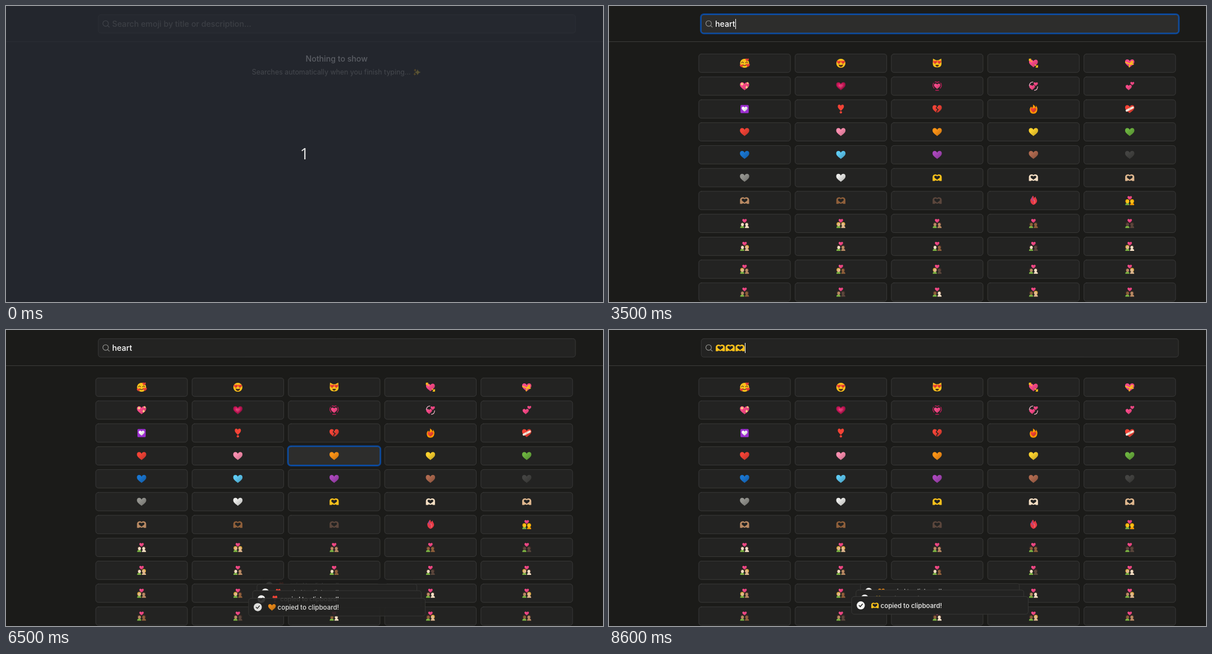
An HTML page with a canvas that plays this animation: 1063x527 px, repeating every 8800 ms.

```html
<!DOCTYPE html>
<html lang="en">
<head>
<meta charset="utf-8">
<title>Emoji search</title>
<style>
  html, body { margin: 0; width: 100%; height: 100%; overflow: hidden; background: #1b1b19; }
  canvas { display: block; }
</style>
</head>
<body>
<canvas id="stage" width="1063" height="527"></canvas>
<script>
const ctx = document.getElementById('stage').getContext('2d');
const LOOP = 8800;
const K = 1063 / 1200; // layout pixels to stage pixels
const BG = '#1b1b19', PANEL = '#232322', ACTIVE = '#2d2d2c', LINE = '#3c3c3a';
const RED = '#f44336', PINK = '#ff4b8b', YELLOW = '#fcc21b', DARK = '#4a2c20';
const TONES = ['#f5dfc4', '#e0b88f', '#b98a63', '#8f5f3a', '#5b463c'];

// The CSS "ease" curve, cubic-bezier(.25, .1, .25, 1)
function ease(p) {
  if (p <= 0) return 0;
  if (p >= 1) return 1;
  let lo = 0, hi = 1, u;
  for (let i = 0; i < 20; i++) {
    u = (lo + hi) / 2;
    const x = .75 * u * (1 - u) + u ** 3;
    if (x < p) lo = u; else hi = u;
  }
  return .3 * u * (1 - u) ** 2 + 3 * u * u * (1 - u) + u ** 3;
}

// ---- drawing helpers ----
const paths = {};
const path = d => paths[d] ??= new Path2D(d);
const HEART = 'M0 8C-3 5-9 2-9-3C-9-8.5-2-9 0-4.2C2-9 9-8.5 9-3C9 2 3 5 0 8Z';
const STAR = 'M0-5Q.8-.8 5 0Q.8.8 0 5Q-.8.8-5 0Q-.8-.8 0-5Z';

function shape(color, d, x = 0, y = 0, s = 1, sy = s) {
  ctx.save();
  ctx.translate(x, y);
  ctx.scale(s, sy);
  ctx.fillStyle = color;
  ctx.fill(path(d), 'evenodd');
  ctx.restore();
}
function line(color, width, d) {
  ctx.strokeStyle = color;
  ctx.lineWidth = width;
  ctx.lineCap = ctx.lineJoin = 'round';
  ctx.stroke(path(d));
}
function oval(color, x, y, rx, ry = rx) {
  ctx.fillStyle = color;
  ctx.beginPath();
  ctx.ellipse(x, y, rx, ry, 0, 0, 7);
  ctx.fill();
}
function faded(alpha, draw) {
  if (alpha <= 0) return;
  ctx.save();
  ctx.globalAlpha *= alpha;
  draw();
  ctx.restore();
}
function heart(color, x = 0, y = 0, s = 1) {
  shape(color, HEART, x, y, s);
  const shade = ctx.createLinearGradient(-3, -4, 6, 6);
  shade.addColorStop(0, 'rgba(0,0,0,0)');
  shade.addColorStop(1, 'rgba(0,0,0,.2)');
  shape(shade, HEART, x, y, s);
}
function text(str, x, y, size, weight, color, align = 'left') {
  ctx.font = `${weight} ${size * K}px Inter, sans-serif`;
  ctx.fillStyle = color;
  ctx.textAlign = align;
  ctx.fillText(str, x, y);
}
const textWidth = str => {
  ctx.font = `500 ${16 * K}px Inter, sans-serif`;
  return ctx.measureText(str).width;
};

// ---- emoji, each about 18 units wide around the origin ----
const plain = color => () => heart(color);
function smile() {
  shape(DARK, 'M-4.5 2.5Q0 4 4.5 2.5Q3.5 7 0 7Q-3.5 7-4.5 2.5Z');
}
function heartEyes() {
  heart(RED, -4, -2, .42);
  heart(RED, 4, -2, .42);
}
function loveFace() {
  oval(YELLOW, 0, 0, 8.8);
  line(DARK, 1.2, 'M-6-1Q-4-4-2-1M2-1Q4-4 6-1M-3 3Q0 6 3 3');
  heart(RED, -6, 5, .36);
  heart(RED, 6.5, 4, .42);
  heart(RED, 5, -6.5, .36);
}
function eyesFace() {
  oval(YELLOW, 0, 0, 8.8);
  heartEyes();
  smile();
}
function eyesCat() {
  shape(YELLOW, 'M-8-9L-2-6H2L8-9L8.5 1Q8 8 0 8Q-8 8-8.5 1Z');
  heartEyes();
  shape(DARK, 'M-3.5 3H3.5Q2.5 6.5 0 6.5Q-2.5 6.5-3.5 3Z');
}
function arrowHeart() {
  heart(PINK, 0, 0, .95);
  line(YELLOW, 1.7, 'M-8-8L-3-3M3 3L8 7M-8-5V-8H-5M8 4V7.5H5');
}
function giftHeart() {
  heart(PINK);
  line(YELLOW, 2, 'M-8-2Q0 2 7 2M1 1L-1 7M1 1Q4-6 6-3Q6 0 1 1');
}
function sparkleHeart() {
  heart(PINK);
  shape('#ffe082', STAR, -5, -4, .7);
  shape('#ffe082', STAR, 4, 2, .65);
  shape('#ffe082', STAR, 6, -6, .5);
}
function growingHeart() {
  heart('#b0154f');
  heart('#d81b60', 0, 0, .75);
  heart('#e8407a', 0, 0, .45);
}
function beatingHeart() {
  heart(PINK, 0, 0, .68);
  line('#d81b60', 1.3, 'M-7-6Q-10-1-6 4M7-6Q10-1 6 4M-4-8Q-2-9 0-7Q2-9 4-8M-3 8H3');
}
function revolvingHearts() {
  heart(PINK, -2.5, 2.5, .62);
  heart(PINK, 4.5, -4, .46);
  line('#f8bbd0', 1.3, 'M-8-1Q-7-8-1-8M8 1Q8 7 2 8');
}
function twoHearts() {
  heart(PINK, -2, 2.5, .66);
  heart(PINK, 5, -5, .42);
}
function heartTile() {
  shape('#9c2fd0', 'M-6-8H6Q8-8 8-6V6Q8 8 6 8H-6Q-8 8-8 6V-6Q-8-8-6-8Z');
  heart('#fff', 0, 0, .62);
}
function heartMark() {
  shape(RED, HEART, 0, -2.8, .66, .8);
  oval(RED, 0, 6.3, 2.3);
}
function brokenHeart() {
  heart(RED);
  line(PANEL, 1.5, 'M1-6L-2-2L2 1L-1 4L0 8');
}
function burningHeart() {
  shape('#ff9800', 'M-1-9Q3-7 4-3Q6-4 5-7Q9-2 7 4Q5 9 0 9Q-6 9-7 3Q-8-2-4-5L-3-2Q0-5-1-9Z');
  heart(RED, 0, 2, .6);
}
function mendedHeart() {
  heart(RED);
  line('#f3e5d8', 4, 'M-6 3L6-3');
  line('#c9a58a', .9, 'M-1-1L1 1M1-1L-1 1');
}
const hands = color => () => shape(color,
  'M-8.8-2Q-8-6-4-6.5Q-1-6.5 0-5Q1-6.5 4-6.5Q8-6 8.8-2V6.2H4.8L3 5Q0 7-3 5L-4.8 6.2H-8.8Z' +
  'M0 4C-2 2-5.5 1-5.5-1.8C-5.5-4.5-1.5-4.5 0-2.4C1.5-4.5 5.5-4.5 5.5-1.8C5.5 1 2 2 0 4Z');
const goldHands = hands(YELLOW);
function organ() {
  shape('#e53946', 'M-2-9H0L1-5L4-8L5-5Q9 0 5 5Q2 9-1 8Q-7 4-6-2Q-5-5-3-5Z');
  line('#7e57c2', 1.4, 'M-3-6Q-4-2 0 0');
  line('#ff8a80', 1, 'M1-2Q4 1 2 5');
}
const couple = (a, b) => () => {
  [a, b].forEach((tone, i) => {
    const x = i ? 4.6 : -4.6;
    const hair = tone < 0 ? '#f5a800' : tone === 1 ? '#dba63a' : '#3b2b26';
    oval(hair, x, 1.2, 3.8, 4);
    shape(i ? (tone < 0 ? '#ffa000' : TONES[tone]) : '#7cb342', 'M-4 4Q-4 0 0 0Q4 0 4 4Z', x, 4.7);
    oval(tone < 0 ? YELLOW : TONES[tone], x + (i ? -.5 : .5), 2, 2.8, 3.2);
  });
  heart(PINK, 0, -5.2, .48);
};
function sparkles() {
  shape('#fdd835', STAR, 1.5, 0, 1.5);
  shape('#ffb300', STAR, -5.5, 4.5, .7);
  shape('#ffb300', STAR, -4.5, -5, .7);
}

const pairs = [0, 1, 2, 3, 4].map(n => [n, n]);
for (let a = 0; a < 5; a++)
  for (let b = 0; b < 5; b++) if (a !== b) pairs.push([a, b]);

const GRID = [
  loveFace, eyesFace, eyesCat, arrowHeart, giftHeart,
  sparkleHeart, growingHeart, beatingHeart, revolvingHearts, twoHearts,
  heartTile, heartMark, brokenHeart, burningHeart, mendedHeart,
  ...[RED, '#ff8fb1', '#ff9416', '#fdd32e', '#6cb33f',
    '#1976d2', '#5ecbf5', '#ab47bc', '#b06a4f', '#444442',
    '#94948f', '#ececea'].map(plain),
  goldHands, ...TONES.map(hands), organ, couple(-1, -1),
  ...pairs.slice(0, 20).map(p => couple(...p)),
];

function emoji(draw, x, y, size = 1) {
  ctx.save();
  ctx.translate(x, y);
  ctx.scale(.92 * size, .92 * size);
  draw();
  ctx.restore();
}

// ---- timeline ----
const INPUT = -1, NONE = -2;
const FOCUS = [[500, INPUT], [3800, 0], [4360, 5], [4680, 10], [4880, 11], [5800, 16], [5950, 17],
  [6550, 22], [6750, 27], [7300, NONE], [7720, INPUT], [8080, NONE]];
const TOASTS = [[5030, heartMark], [5200, heartMark], [5400, heartMark],
  [6250, plain('#ff9416')], [6935, goldHands], [7070, goldHands]];
const KEYS = [1400, 1500, 1600, 1700, 1900];
const PASTES = [8100, 8500, 8600];
const CARET = [[600, 1200], [1400, 2500], [3100, 4450], [8000, LOOP]];

const within = (t, from, to) => t >= from && t < to;
const passed = (t, times) => times.filter(at => t >= at).length;

function focusOf(t, target) {
  let sum = 0;
  FOCUS.forEach(([at, id], i) => {
    if (id !== target) return;
    const next = FOCUS[i + 1];
    sum += ease((t - at) / 200) - (next ? ease((t - next[0]) / 200) : 0);
  });
  return sum;
}

// ---- parts of the page ----
function box(x, y, w, h, focus = 0) {
  const trace = inset => {
    ctx.beginPath();
    ctx.roundRect(x + inset, y + inset, w - 2 * inset, h - 2 * inset, 5 - inset);
  };
  const stroke = (inset, color, width) => {
    trace(inset);
    ctx.strokeStyle = color;
    ctx.lineWidth = width;
    ctx.stroke();
  };
  trace(0);
  ctx.fillStyle = PANEL;
  ctx.fill();
  faded(focus, () => { ctx.fillStyle = ACTIVE; ctx.fill(); });
  stroke(.45, LINE, .9);
  faded(focus, () => {
    stroke(-.85, '#08469a', 1.75);
    stroke(.45, '#0b5dcc', .9);
  });
}

function searchBar(t) {
  box(163.8, 15, 850.6, 33.6, focusOf(t, INPUT));
  line('#9a9a97', 1.1, 'M182.3 31.2A4.9 4.9 0 1 1 172.5 31.2A4.9 4.9 0 1 1 182.3 31.2M181 34.8L184 37.6');
  const typed = 'heart'.slice(0, passed(t, KEYS));
  const pasted = passed(t, PASTES);
  let end = 189;
  if (pasted) {
    for (let i = 0; i < pasted; i++) emoji(goldHands, 198.2 + 17.6 * i, 32);
    end += 17.6 * pasted;
  } else if (typed) {
    end += textWidth(typed);
    if (t >= 7900) {
      ctx.fillStyle = '#0b43a3';
      ctx.fillRect(189, 23, end - 189, 18);
    }
    text(typed, 189, 37.1, 16, 500, '#fff');
  } else {
    text('Search emoji by title or description...', 189, 37.1, 16, 500, '#7d7d7a');
  }
  if (CARET.some(span => within(t, ...span))) {
    ctx.fillStyle = '#fff';
    ctx.fillRect(Math.round(end), 23, 1, 18);
  }
}

function message(t) {
  const waiting = t >= 3100;
  text(waiting ? 'Searching...' : 'Nothing to show', 588.7, 99.1, 16, 500, '#fff', 'center');
  if (waiting) {
    text('Please wait while we look for all emoji that match your search...', 588.7, 122.4, 14, 400, '#a3a3a0', 'center');
  } else {
    text('Searches automatically when you finish typing...', 579.2, 122.4, 14, 400, '#a3a3a0', 'center');
    emoji(sparkles, 731.8, 118, .8);
  }
}

function results(t) {
  GRID.forEach((draw, i) => {
    const x = 159.4 + 171.45 * (i % 5), y = 85 + 46 * K * Math.floor(i / 5);
    box(x, y, 164.1, 33.7, focusOf(t, i));
    if (draw === heartMark && within(t, 5300, 6250)) {
      ctx.fillStyle = '#0b43a3';
      ctx.fillRect(x + 73.2, y + 7.3, 17.6, 18.5);
    }
    emoji(draw, x + 82, y + 17);
  });
}

function toasts(t) {
  const entered = TOASTS.map(([at]) => ease((t - at) / 400));
  TOASTS.forEach(([, draw], i) => {
    const depth = entered.slice(i + 1).reduce((a, b) => a + b, 0);
    const scale = 1 - .05 * depth;
    faded(entered[i] * (1 - (entered[i + 3] || 0)), () => {
      ctx.translate(589.2, 490.3 + 32.3 * (1 - entered[i]) - 14 * K * depth);
      ctx.scale(scale, scale);
      box(-157.7, -16.2, 315.4, 32.4);
      oval('#f4f4f2', -140.9, 0, 7.2);
      line(PANEL, 1.5, 'M-143.8.2L-141.7 2.3L-137.9-2.2');
      emoji(draw, -115.6, .2, .82);
      text('copied to clipboard!', -105.6, 4.2, 13, 500, '#f4f4f2');
    });
  });
}

function countdown() {
  ctx.fillStyle = 'rgba(39,43,52,.76)';
  ctx.fillRect(0, 0, 1063, 527);
  ctx.font = '28px "Open Sans", sans-serif';
  ctx.textAlign = 'center';
  ctx.fillStyle = '#e4e4e4';
  ctx.fillText('1', 531.5, 273);
}

function render(t) {
  ctx.fillStyle = BG;
  ctx.fillRect(0, 0, 1063, 527);
  ctx.fillStyle = LINE;
  ctx.fillRect(0, 63, 1063, 1);
  searchBar(t);
  if (t < 3500) message(t); else results(t);
  toasts(t);
  if (t < 100) countdown();
}

const start = performance.now();
function tick() {
  render((performance.now() - start) % LOOP);
  requestAnimationFrame(tick);
}
tick();
</script>
</body>
</html>
```
